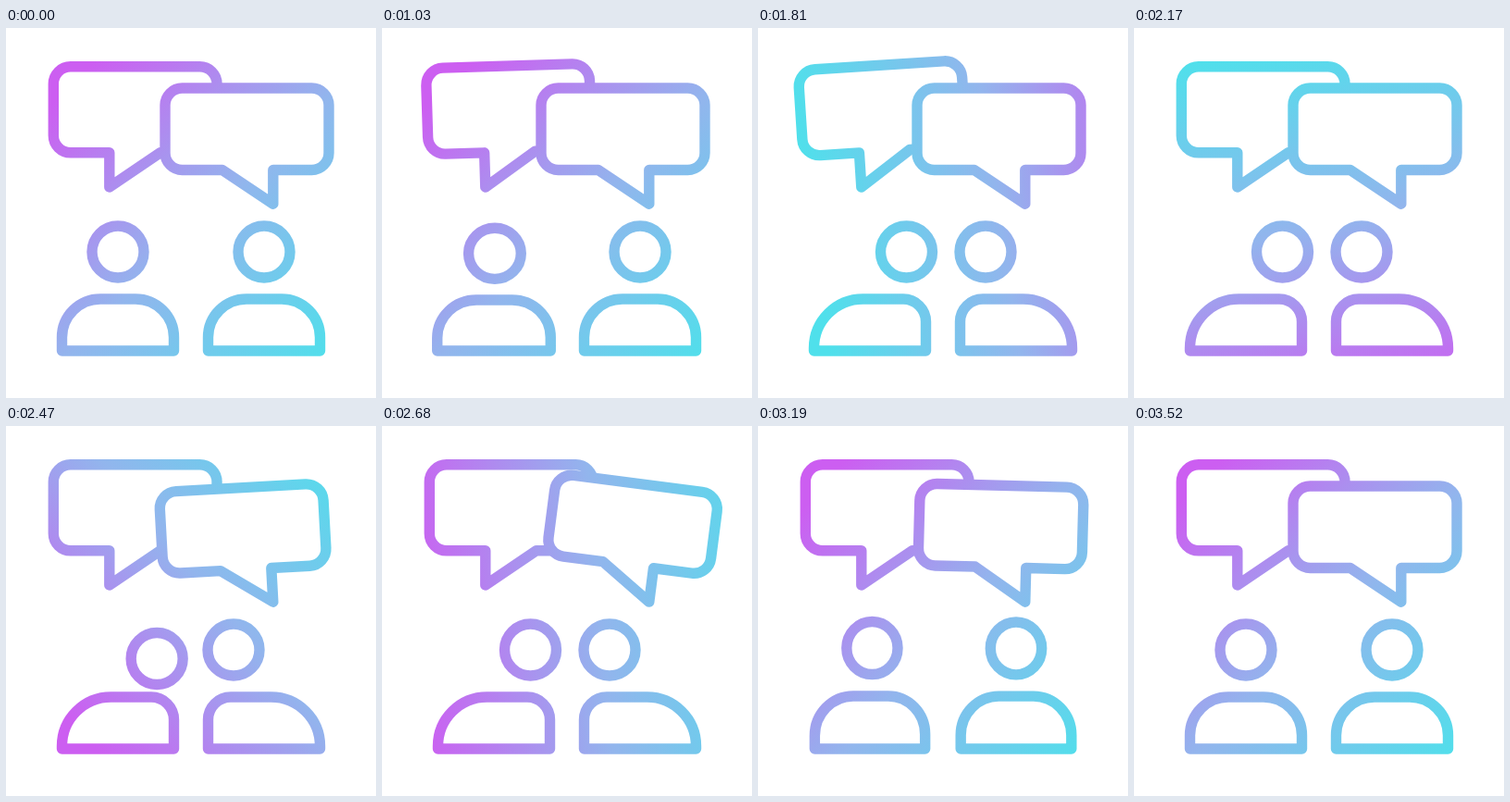
Recreate the animation shown at these times as an HTML page. Size 400 by 400 pixels, loop 3550 ms.

```html
<!DOCTYPE html>
<html lang="en">
<head>
<meta charset="utf-8">
<title>Two people talking</title>
<style>
html, body { margin: 0; width: 100%; height: 100%; overflow: hidden; background: #fff; }
svg { display: block; width: 100vw; height: 100vh; }
</style>
</head>
<body>
<svg viewBox="0 0 400 400">
  <defs>
    <linearGradient id="grad" gradientUnits="userSpaceOnUse">
      <stop offset="0" stop-color="#cc5ef1"/>
      <stop offset=".5" stop-color="#92b5ed"/>
      <stop offset="1" stop-color="#4fe0eb"/>
    </linearGradient>
    <mask id="lines" maskUnits="userSpaceOnUse" x="0" y="0" width="400" height="400">
      <g fill="#000" stroke="#fff" stroke-width="11.4" stroke-linejoin="round">
        <path id="bubbleL"/>
        <path id="bubbleR"/>
        <path id="bodyL"/>
        <path id="bodyR"/>
        <ellipse id="headL"/>
        <ellipse id="headR"/>
      </g>
    </mask>
  </defs>
  <rect width="400" height="400" fill="url(#grad)" mask="url(#lines)"/>
</svg>
<script>
const LOOP = 3550, START = 1030, STEP = 30;
const { PI, sin, cos, min, max } = Math;
const set = (id, attrs) => {
  for (const k in attrs) document.getElementById(id).setAttribute(k, attrs[k]);
};
const clamp = x => max(0, min(1, x));
const smooth = x => (x = clamp(x), x * x * (3 - 2 * x));
// One hump, 0 to 1 to 0, while x runs from 0 to 1
const hump = (x, power) => sin(PI * clamp(x)) ** power;

// Rounded bubble from left x to right x; dir 1 points the tail's slope right, -1 left
function bubblePath(x0, x1, top, bottom, tipX, tipY, dir) {
  const r = 18.5, [a, b] = dir > 0 ? [x0, x1] : [x1, x0], k = dir * r;
  const arc = (x, y) => `A${r} ${r} 0 0 ${dir > 0 ? 1 : 0} ${x} ${y}`;
  return `M${tipX} ${bottom}H${a + k}${arc(a, bottom - r)}V${top + r}${arc(a + k, top)}`
    + `H${b - k}${arc(b, top + r)}V${bottom - r}${arc(b - k, bottom)}`
    + `H${tipX + dir * 55}L${tipX} ${tipY}Z`;
}
set('bubbleL', { d: bubblePath(51.3, 228, 41.8, 134.8, 111.8, 172, 1) });
set('bubbleR', { d: bubblePath(172, 349, 65, 153.5, 288.8, 190.2, -1) });

// Rise to the first peak, then swing with linearly fading width
function swing(t, attack) {
  const rise = 240, period = 490, fade = 870;
  if (t < rise) return attack(clamp(t / rise));
  return cos(2 * PI * (t - rise) / period) * clamp(1 - (t - rise) / fade);
}
const pushOut = x => sin(PI / 2 * x) ** 1.5;
const pullBack = x => x * x * (3.7 * x - 2.7);

// A person's turn: how far, the dip of the head and the squash of the whole figure
const turn = t => smooth(t / 330);
const dip = t => 9 * hump(t / 200, 4);
const squash = t => t > 0 && t < 430 ? .042 * sin(2 * PI * t / 430) * (1 - .7 * t / 430) : 0;

// side 1 is the left person, -1 the mirrored one on the right
function person(name, side, t, go, back, reach, nod) {
  const a = t - go, b = t - back;
  const m = turn(a) - turn(b), q = squash(a) + squash(b);
  const sx = 1 + .75 * q, sy = 1 - q;
  const X = x => 200 + side * ((x - 121) * sx - 79);
  const Y = y => 349 + (y - 349) * sy;
  const outer = 41.5 + 11.5 * m, inner = 41.5 - 17 * m;
  const arc = (r, x, y) => `A${r * sx} ${r * sy} 0 0 ${side > 0 ? 1 : 0} ${X(x)} ${Y(y)}`;
  set('body' + name, {
    d: `M${X(60.5)} 349V${Y(293 + outer)}${arc(outer, 60.5 + outer, 293)}`
      + `H${X(181.5 - inner)}${arc(inner, 181.5, 293 + inner)}V349Z`
  });
  set('head' + name, {
    cx: X(121 + reach * m + nod * .28), cy: Y(242) + dip(b) + nod,
    rx: 28 * sx, ry: 28 * sy
  });
}

// The gradient makes one full turn, from corner to corner, around an off-centre pivot
function paint(t) {
  const p = clamp((t - 1000) / 2500);
  const turned = 2 * PI * smooth(1 - (1 - p) ** 1.3), a = PI / 4 + turned;
  const shift = 27 * cos(turned) - 40 * sin(turned) - 12;
  const at = d => [200 + cos(a) * (shift + d), 200 + sin(a) * (shift + d)];
  const [x1, y1] = at(-205), [x2, y2] = at(205);
  set('grad', { x1, y1, x2, y2 });
}

function draw(t) {
  paint(t);
  set('bubbleL', { transform: `rotate(${-20.5 * swing(t - 1000, pushOut)} 112 172)` });
  set('bubbleR', { transform: `rotate(${15 * swing(t - 2362, pullBack)} 289 190)` });
  person('L', 1, t, 1000, 2910, 39.5, 10 * hump((t - 2350) / 280, 2));
  person('R', -1, t, 1060, 2830, 33, 0);
}

const begin = performance.now();
function frame() {
  const t = (performance.now() - begin) % LOOP;
  draw(t < START ? 0 : START + Math.floor((t - START) / STEP) * STEP);
  requestAnimationFrame(frame);
}
frame();
</script>
</body>
</html>
```
